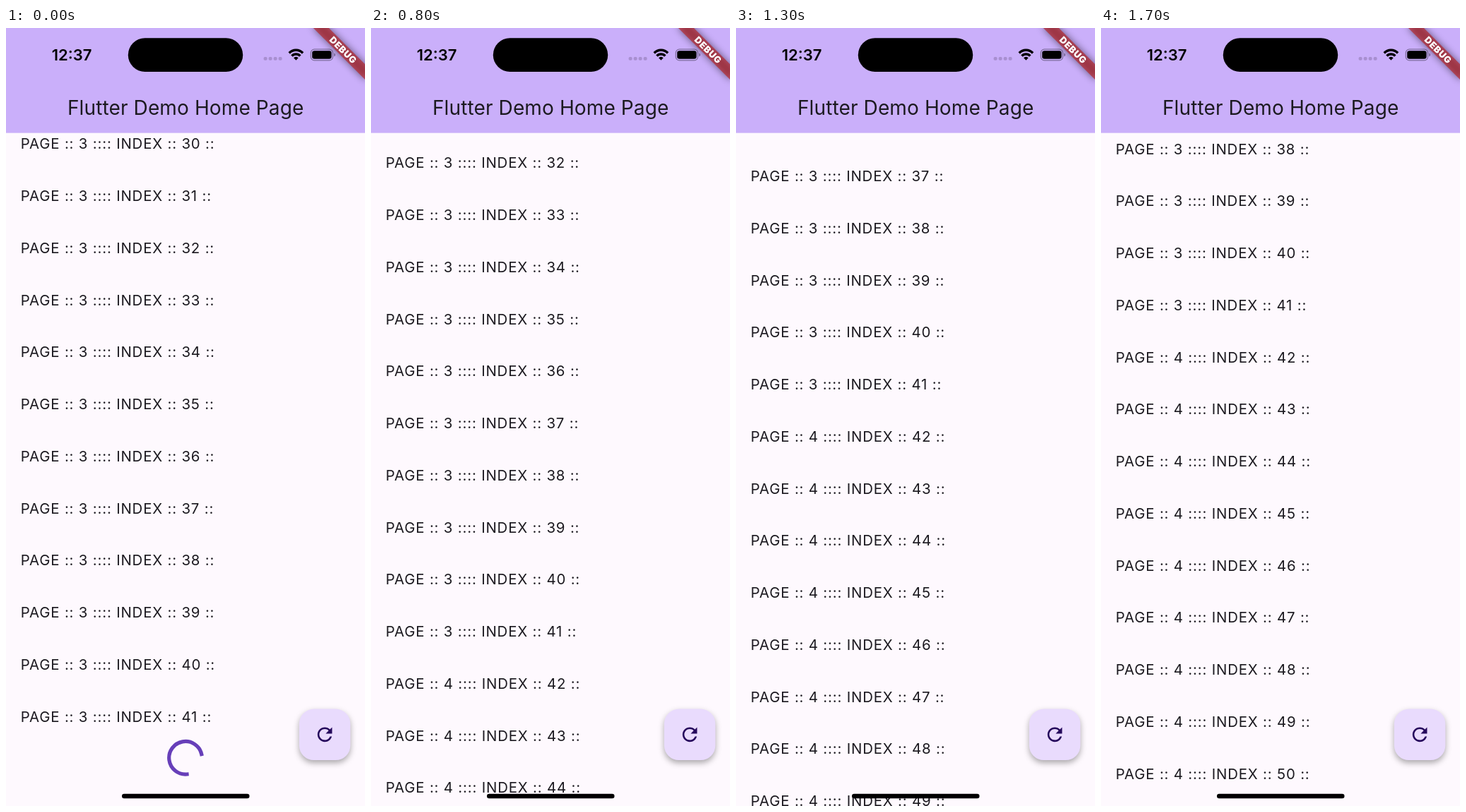
An HTML page that plays this animation: 508x1102 px, repeating every 1800 ms.

```html
<!DOCTYPE html>
<html lang="en">
<head>
<meta charset="utf-8">
<title>Endless list</title>
<style>
  html, body { margin: 0; width: 100%; height: 100%; overflow: hidden; background: #fef9fe; }
  svg { display: block; width: 508px; height: 1102px; font-family: Inter, sans-serif; fill: #1c1a20; }
  #list { font-size: 20.4px; letter-spacing: .82px; white-space: pre; }
  #fab { fill: #e9dbfd; filter: drop-shadow(0 4px 4px rgba(0, 0, 0, .33)); }
  #bannerShadow { fill: #000; opacity: .5; filter: blur(5.1px); }
</style>
</head>
<body>
<svg viewBox="0 0 508 1102">
  <rect width="508" height="1102" fill="#fef9fe"/>
  <g id="list"></g>
  <path id="spinner" fill="none" stroke="#673fb9" stroke-width="5.2" stroke-linecap="square"/>

  <rect width="508" height="148.65" fill="#caaffa"/>
  <text x="254.2" y="123" font-size="28" letter-spacing=".12" text-anchor="middle">Flutter Demo Home Page</text>

  <g fill="#000">
    <text x="93" y="46" font-size="22" font-weight="600" text-anchor="middle">12:37</text>
    <rect x="172.8" y="14.3" width="162.4" height="47.8" rx="23.9"/>
    <g id="signal" fill="#a88fd0"></g>
    <g transform="translate(399.4 29.6) scale(1.2926)">
      <path d="M1 4.55A10.3 10.3 0 0 1 16 4.55M3.9 7.7A6.3 6.3 0 0 1 13.1 7.7" fill="none" stroke="#000" stroke-width="2.59"/>
      <path d="M8.5 12.4L5.9 9.8A3.9 3.9 0 0 1 11.1 9.8z"/>
    </g>
    <rect x="431.3" y="30.2" width="31.2" height="15.6" rx="5" fill="none" stroke="#000" stroke-opacity=".38" stroke-width="1.3"/>
    <rect x="433.2" y="32.2" width="27.4" height="11.6" rx="3.3"/>
    <path d="M464.3 35.4a2.8 2.8 0 0 1 0 5.2z" opacity=".42"/>
    <rect x="164" y="1084.8" width="180.5" height="6.5" rx="3.25"/>
  </g>

  <rect id="fab" x="414.9" y="964.6" width="72.4" height="72.4" rx="20.7"/>
  <path fill="#25085c" transform="translate(435.6 985.3) scale(1.2926)" d="M17.65 6.35C16.2 4.9 14.21 4 12 4c-4.42 0-7.99 3.58-7.99 8s3.57 8 7.99 8c3.73 0 6.84-2.55 7.73-6h-2.08c-.82 2.33-3.04 4-5.65 4-3.31 0-6-2.69-6-6s2.69-6 6-6c1.66 0 3.14.69 4.22 1.78L13 11h7V4z"/>

  <g transform="translate(508) rotate(45)">
    <rect id="bannerShadow" x="-51.7" y="36.2" width="103.4" height="15.5"/>
    <rect x="-51.7" y="36.2" width="103.4" height="15.5" fill="#b71c1c" fill-opacity=".627"/>
    <text x=".3" y="48.7" font-size="13" letter-spacing=".6" font-weight="900" text-anchor="middle" fill="#fff">DEBUG</text>
  </g>
</svg>
<script>
const LOOP = 1800, STEP = 100, LOADED = 400, FLING = 700;
const FIRST = 30, LAST = 51, NEXT_PAGE = 42, PITCH = 73.75;
const list = document.getElementById('list');
const spinner = document.getElementById('spinner');

function add(parent, tag, attrs, text = '') {
  const el = document.createElementNS('http://www.w3.org/2000/svg', tag);
  for (const key in attrs) el.setAttribute(key, attrs[key]);
  el.textContent = text;
  return parent.appendChild(el);
}

const newRows = [];
for (let i = FIRST; i <= LAST; i++) {
  const page = i < NEXT_PAGE ? 3 : 4;
  const row = add(list, 'text', { x: 20.7, y: 172.3 + (i - FIRST) * PITCH },
    `PAGE :: ${page} :::: INDEX :: ${i} ::`);
  if (page === 4) newRows.push(row);
}
for (let i = 0; i < 4; i++) {
  add(document.getElementById('signal'), 'rect', { x: 364.6 + i * 7, y: 41, width: 5, height: 4.8, rx: 1.7 });
}

// Friction scroll: speed falls to 13.5 % every second.
function scrollAt(t) {
  if (t < LOADED) return 1;
  if (t <= FLING) return 0;
  return 674.9 - 370.9 * 0.135 ** ((t - 1000) / 1000);
}

// The whole arc rotates while its tail catches up with the head.
function spinnerArc(t) {
  const tail = 3.9 * (Math.max(0, t - 80) / 666) ** 2;
  const start = 85 + 0.2296 * t + 262 * tail;
  const sweep = 262 * (1 - tail);
  const point = deg => {
    const a = deg * Math.PI / 180;
    return `${254 + 23.3 * Math.cos(a)} ${1033.8 + 23.3 * Math.sin(a)}`;
  };
  return `M${point(start)}A23.3 23.3 0 ${sweep > 180 ? 1 : 0} 1 ${point(start + sweep)}`;
}

function draw(now) {
  const t = Math.floor(now % LOOP / STEP) * STEP;
  const loading = t < LOADED;
  list.setAttribute('transform', `translate(0 ${-scrollAt(t)})`);
  for (const row of newRows) row.style.display = loading ? 'none' : '';
  spinner.style.display = loading ? '' : 'none';
  if (loading) spinner.setAttribute('d', spinnerArc(t));
}

const began = performance.now();
function tick() {
  draw(performance.now() - began);
  requestAnimationFrame(tick);
}
tick();
</script>
</body>
</html>
```
